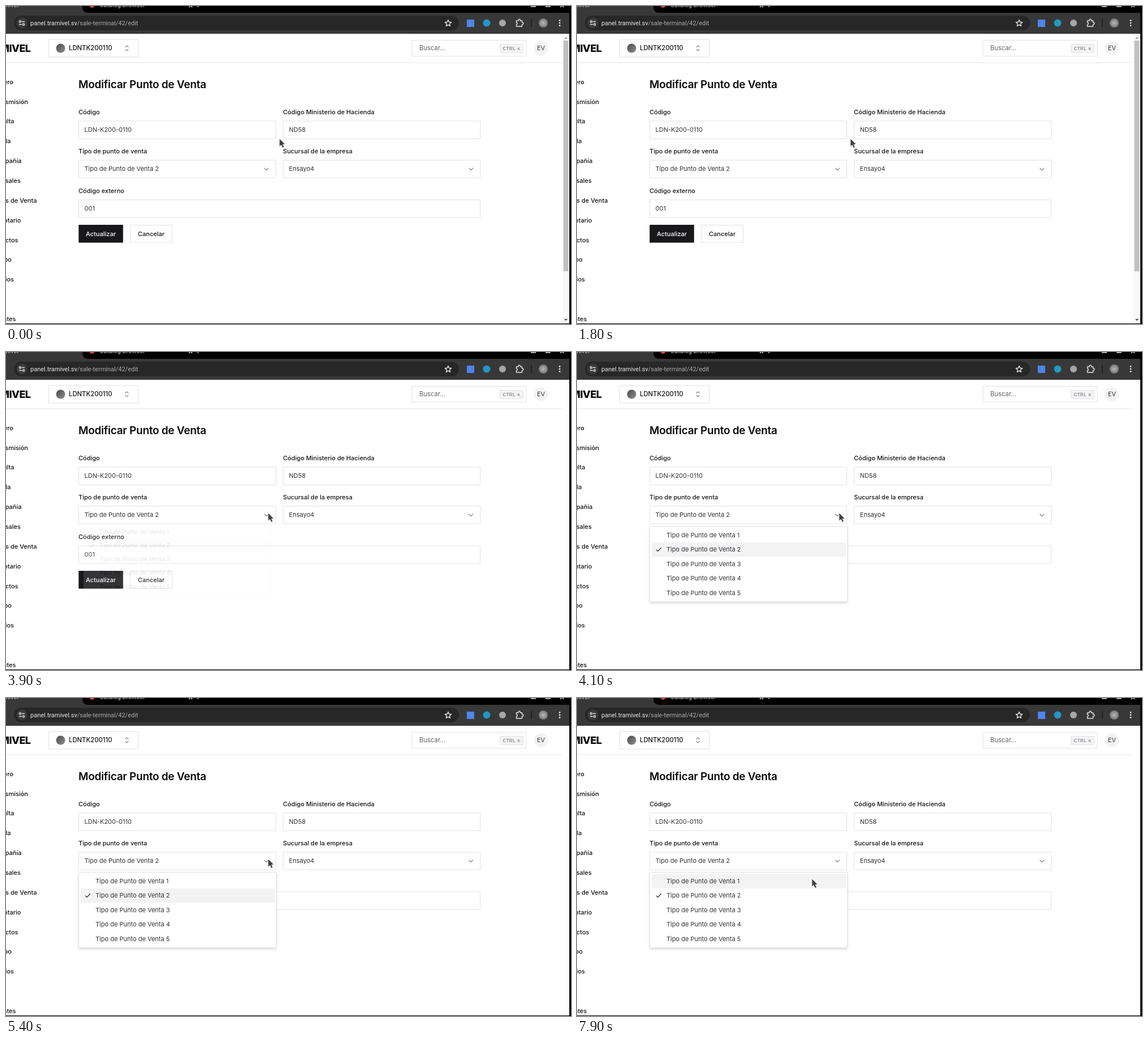
An HTML page that plays this animation: 998 by 561 pixels, repeating every 8000 ms.

```html
<!DOCTYPE html>
<html lang="es">
<head>
<meta charset="utf-8">
<title>Modificar Punto de Venta</title>
<style>
  html, body { margin: 0; width: 100%; height: 100%; overflow: hidden; background: #fff; }
  svg { display: block; width: 100vw; height: 100vh; }
  text { font-family: Inter, sans-serif; font-size: 11px; fill: #333338; white-space: pre; }
  .label { font-weight: 450; fill: #151518; }
  .head { font-weight: 550; fill: #111114; }
  .title { font-size: 18.9px; font-weight: 600; letter-spacing: -.012em; fill: #09090b; }
  .brand { font-size: 18px; font-weight: 800; letter-spacing: -.03em; fill: #09090b; }
  .muted { font-size: 11.3px; fill: #63636b; }
  .url { font-family: Roboto, sans-serif; fill: #e8e8e8; }
  .tab { font-family: Roboto, sans-serif; fill: #c9c9c9; }
  .mono { font-family: "Liberation Mono", monospace; font-size: 9.4px; fill: #71717a; }
  .box { fill: #fff; stroke: #e2e2e5; stroke-width: 1; }
  .line { fill: none; stroke: #85858b; stroke-width: 1.1; stroke-linecap: round; stroke-linejoin: round; }
  .icon { fill: none; stroke: #e3e3e3; stroke-width: 1.4; stroke-linejoin: round; }
  .pointer path { fill: #414143; stroke: #f4f4f4; stroke-width: .6; stroke-linejoin: round; }
</style>
</head>
<body>
<svg viewBox="0 0 998 561" preserveAspectRatio="none">
  <defs>
    <linearGradient id="ball" x1="0" y1="0" x2="1" y2="1">
      <stop offset="0" stop-color="#4a4a4a"/><stop offset="1" stop-color="#8e8e8e"/>
    </linearGradient>
    <radialGradient id="face"><stop offset="0" stop-color="#b8b8b8"/><stop offset="1" stop-color="#777"/></radialGradient>
    <filter id="shadow" x="-5%" y="-5%" width="110%" height="115%">
      <feDropShadow dx="0" dy="2.5" stdDeviation="2" flood-opacity=".13"/>
    </filter>
  </defs>
  <rect width="998" height="561" fill="#fff"/>

  <g id="browser">
    <rect width="998" height="49" fill="#383838"/>
    <path d="M135 0H998V12H146Q135 12 135 2Z" fill="#000"/>
    <text class="tab" x="22" y="2" text-anchor="end">Tramivel</text>
    <circle cx="152" cy="-1" r="4" fill="#e5482d"/>
    <text class="tab" x="165" y="2">Catalog Browser</text>
    <path d="M323 2L326-1L329 2M339-3V2M927 1H936M953 1H961V-4M979 2L982-1L985 2" class="icon"/>
    <rect x="14" y="17" width="786" height="26" rx="13" fill="#272727"/>
    <circle cx="28" cy="30" r="9.5" fill="#3a3a3a"/>
    <path class="icon" d="M28 27.5H33M23 32.5H28"/>
    <circle class="icon" cx="25" cy="27.5" r="1.6"/><circle class="icon" cx="31" cy="32.5" r="1.6"/>
    <text class="url" x="43" y="34">panel.tramivel.sv<tspan fill="#a9aaad">/sale-terminal/42/edit</tspan></text>
    <path id="star" class="icon"/>
    <rect x="814" y="24" width="13" height="13" fill="#4d86e8"/>
    <circle cx="849" cy="30" r="6.5" fill="#2596c4"/>
    <circle cx="877" cy="30" r="6" fill="#a5a7aa"/>
    <path class="icon" d="M901.5 26H905V25a1.7 1.7 0 0 1 3.4 0V26H911.5V29h.8a1.7 1.7 0 0 1 0 3.4h-.8V36H901.5V32.8a1.8 1.8 0 0 0 0-3.6Z"/>
    <path d="M928 23V37" stroke="#1c1c1e" stroke-width="1.5"/>
    <circle cx="949" cy="30" r="8" fill="url(#face)"/>
    <g fill="#e3e3e3"><circle cx="978" cy="25.5" r="1.4"/><circle cx="978" cy="30" r="1.4"/><circle cx="978" cy="34.5" r="1.4"/></g>
  </g>

  <g id="topbar">
    <path d="M0 100H983" stroke="#e6e6e8"/>
    <text class="brand" x="43.5" y="81" text-anchor="end">TRAMIVEL</text>
    <rect class="box" x="75.5" y="59" width="158" height="31"/>
    <circle cx="96.500" cy="74.5" r="8" fill="url(#ball)"/>
    <text class="label" x="111" y="78.3" style="font-size:11.3px">LDNTK200110</text>
    <path class="line" d="M211 72.5L213.5 70L216 72.5M211 76.5L213.5 79L216 76.5"/>
    <rect class="box" x="717" y="60.5" width="202" height="28"/>
    <text class="muted" x="730" y="78.3">Buscar...</text>
    <rect x="872.5" y="67.5" width="41" height="15" rx="1" fill="#f4f4f5" stroke="#e2e2e5"/>
    <text class="mono" x="877.5" y="78">CTRL</text>
    <text class="mono" x="903.5" y="78" style="font-size:8px">K</text>
    <circle cx="945" cy="74.5" r="12.5" fill="#f3f3f4"/>
    <text x="945" y="78.3" text-anchor="middle">EV</text>
  </g>

  <g id="menu"></g>
  <g id="form"></g>

  <g id="bar">
    <rect x="983" y="49" width="12" height="512" fill="#f8f8f8"/>
    <rect x="984.5" y="61" width="9" height="407" fill="#c1c1c1"/>
    <path d="M986 58L989 54.5L992 58Z" fill="#a0a0a0"/>
    <path d="M986 552L989 555.5L992 552Z" fill="#505050"/>
  </g>
  <path d="M995 0H998V561H0V560H995Z" fill="#000"/>

  <g id="list">
    <rect class="box" x="128.5" y="307.5" width="349" height="133" rx="1" filter="url(#shadow)"/>
    <rect id="hover" x="132" width="343" height="25.4" fill="#f3f3f4"/>
    <path class="line" style="stroke:#27272a" d="M140 348.8L142.8 351.5L148.5 345.5"/>
  </g>

  <g id="arrow" class="pointer"><path d="M0 0V14L3.2 11.2L5.6 16.2L8.2 15L6 10.2L10 9.8Z"/></g>
  <g id="hand" class="pointer">
    <path d="M-1.5 1Q-.2-1 1.3 1L2.2 5.3Q3.6 4.3 4.6 5.7Q6 5 7 6.4Q9.2 5.8 9.6 8L10 12.5Q9.8 14.5 8.8 16.3H.2Q-1.5 13.500-4.5 10.3Q-5.4 8.5-3.4 8.2L-.2 9.8Z"/>
  </g>
</svg>
<script>
const LOOP = 8000, FRAME = 100, ROW = 25.4;
const $ = id => document.getElementById(id);

function add(parent, tag, attrs, text = "") {
  const el = document.createElementNS("http://www.w3.org/2000/svg", tag);
  for (const key in attrs) el.setAttribute(key, attrs[key]);
  el.textContent = text;
  $(parent).append(el);
}
const write = (parent, text, x, y, cls = "", anchor = "start") =>
  add(parent, "text", { x, y, class: cls, "text-anchor": anchor }, text);

// Sidebar entries: text, right edge, is heading
[["Tablero", 13, 1], ["Transmisión", 39, 1], ["Consulta", 14.5], ["Plantilla", 8.5],
 ["Compañía", 27.5, 1], ["Sucursales", 26], ["Puntos de Venta", 54.5],
 ["Inventario", 26.5, 1], ["Productos", 21.5], ["Equipo", 10, 1], ["Usuarios", 14],
 null, ["Clientes", 17.5, 1]].forEach((item, i) => {
  if (item) write("menu", item[0], item[1], 137.7 + i * 34.85, item[2] ? "head" : "label", "end");
});

function field(x, y, width, label, value, select) {
  write("form", label, x, y - 12, "label");
  add("form", "rect", { class: "box", x: x + .5, y, width, height: 31 });
  write("form", value, x + 10.5, y + 19.3);
  if (select) {
    add("form", "path", { class: "line", d: `M${x + width - 19.5} ${y + 14}l3.500 3.500l3.500-3.500` });
  }
}
write("form", "Modificar Punto de Venta", 128, 145, "title");
field(128, 203, 348, "Código", "LDN-K200-0110");
field(489.3, 203, 348, "Código Ministerio de Hacienda", "ND58");
field(128, 272, 348, "Tipo de punto de venta", "Tipo de Punto de Venta 2", true);
field(489.3, 272, 348, "Sucursal de la empresa", "Ensayo4", true);
field(128, 342, 709, "Código externo", "001");
add("form", "rect", { x: 128.3, y: 386, width: 78.5, height: 31.5, fill: "#18181b" });
add("form", "text", { x: 167.5, y: 405.7, "text-anchor": "middle", style: "fill:#fff;font-weight:500" }, "Actualizar");
add("form", "rect", { class: "box", x: 219.5, y: 386.5, width: 74, height: 30.5 });
write("form", "Cancelar", 256.5, 405.7, "label", "middle");

for (let i = 0; i < 5; i++) write("list", "Tipo de Punto de Venta " + (i + 1), 158, 327 + i * ROW);

const tips = Array.from({ length: 10 }, (_, i) => {
  const r = i % 2 ? 2.7 : 6, a = (i - 2.5) * Math.PI / 5;
  return `${781 + r * Math.cos(a)} ${30.5 + r * Math.sin(a)}`;
});
$("star").setAttribute("d", `M${tips.join("L")}Z`);

// Pointer steps: time, x, y
const path = [[0, 483, 234], [2500, 483, 234], [2800, 466, 277], [2900, 466, 277],
  [3300, 463, 284], [5500, 463, 284], [6200, 415, 318], [6600, 415, 318], [6700, 415, 319], [LOOP, 415, 319]];

function pointAt(t) {
  const i = path.findIndex(step => step[0] > t);
  const [t0, x0, y0] = path[i - 1], [t1, x1, y1] = path[i];
  const p = (t - t0) / (t1 - t0), k = p * p * (3 - 2 * p);
  return [x0 + (x1 - x0) * k, y0 + (y1 - y0) * k];
}

const show = (id, on) => $(id).setAttribute("visibility", on ? "visible" : "hidden");

function render(t) {
  const [x, y] = pointAt(t), open = t >= 3900;
  const hand = y >= 272 && t < 3500;
  for (const id of ["arrow", "hand"]) $(id).setAttribute("transform", `translate(${x} ${y})`);
  show("hand", hand);
  show("arrow", !hand);
  show("bar", !open);
  show("list", open);

  const p = Math.min(1, Math.max(0, (t - 3900) / 150)), k = 1 - (1 - p) ** 2;
  $("list").setAttribute("opacity", .12 + .88 * k);
  $("list").setAttribute("transform",
    `translate(303 ${307 - 5 * (1 - k)}) scale(${.95 + .05 * k}) translate(-303 -307)`);
  $("hover").setAttribute("y", 310.5 + (y > 309 ? 0 : ROW));
}

function tick() {
  render(Math.floor(performance.now() % LOOP / FRAME) * FRAME);
  requestAnimationFrame(tick);
}
tick();
</script>
</body>
</html>
```
